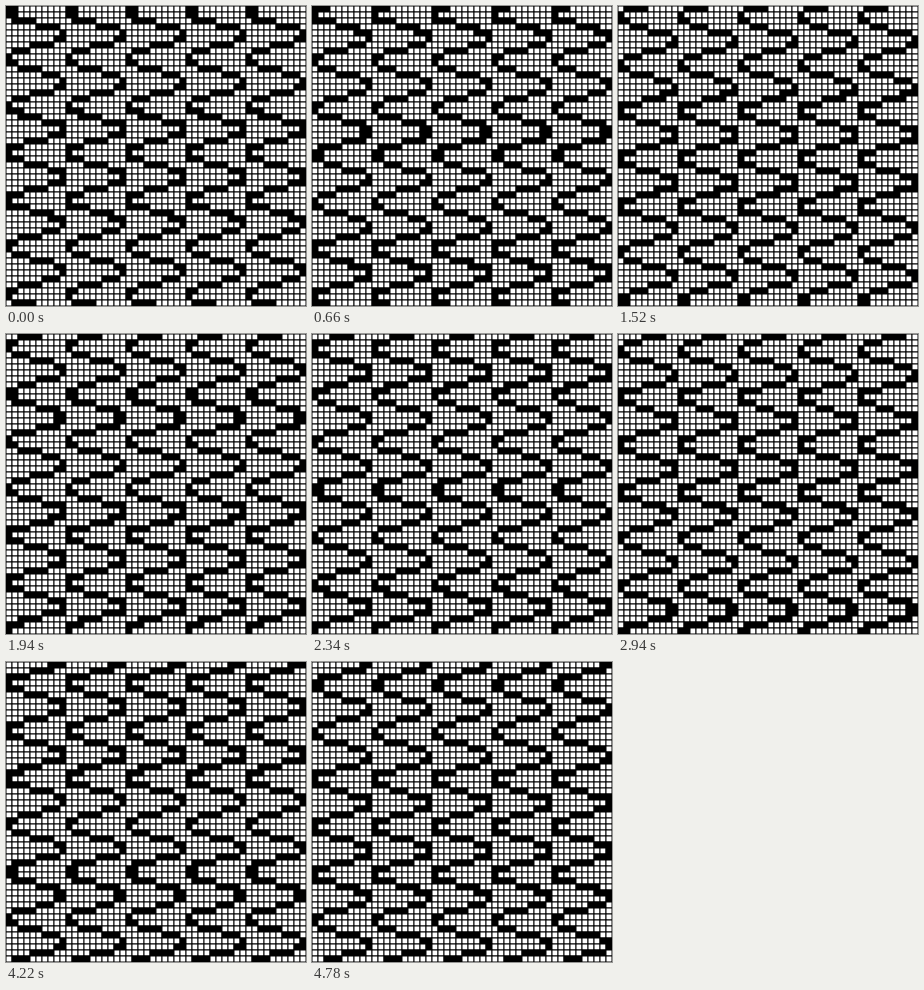
An HTML page with a canvas for the animation above (4800 ms loop, 300 px wide and 300 px high).

```html
<!DOCTYPE html>
<html>
<head>
<meta charset="utf-8">
<title>Woven waves</title>
<style>
  html, body { margin: 0; width: 100%; height: 100%; overflow: hidden; background: #fff; }
  canvas { display: block; }
</style>
</head>
<body>
<canvas id="stage" width="300" height="300"></canvas>
<script>
const ctx = document.getElementById('stage').getContext('2d');
const CELL = 6, COUNT = 50, WIDTH = 10;     // grid cells, and columns per wave
const STEP_MS = 20, STEPS = 240;
const SAMPLES = 4, SPACING = 0.2, OFFSET = 0.89;

// Columns of one wave that are filled in the given row
function filledColumns(row, step) {
  const columns = new Set();
  for (let i = 0; i < SAMPLES; i++) {
    const angle = step * 0.01 - OFFSET - (row * SAMPLES + i) * SPACING;
    columns.add(Math.min(WIDTH - 1, Math.floor(WIDTH / 2 * (1 + Math.sin(angle)))));
  }
  return columns;
}

function draw(step) {
  ctx.fillStyle = '#fff';
  ctx.fillRect(0, 0, 300, 300);
  ctx.strokeStyle = '#000';
  for (let row = 0; row < COUNT; row++) {
    const filled = filledColumns(row, step);
    for (let col = 0; col < COUNT; col++) {
      const box = [col * CELL, row * CELL, CELL, CELL];
      ctx.fillStyle = filled.has(col % WIDTH) ? '#000' : '#fff';
      ctx.fillRect(...box);
      ctx.strokeRect(...box);
    }
  }
}

let shown = -1;
function tick() {
  const step = Math.floor(performance.now() / STEP_MS) % STEPS;
  if (step !== shown) draw(shown = step);
  requestAnimationFrame(tick);
}
tick();
</script>
</body>
</html>
```
